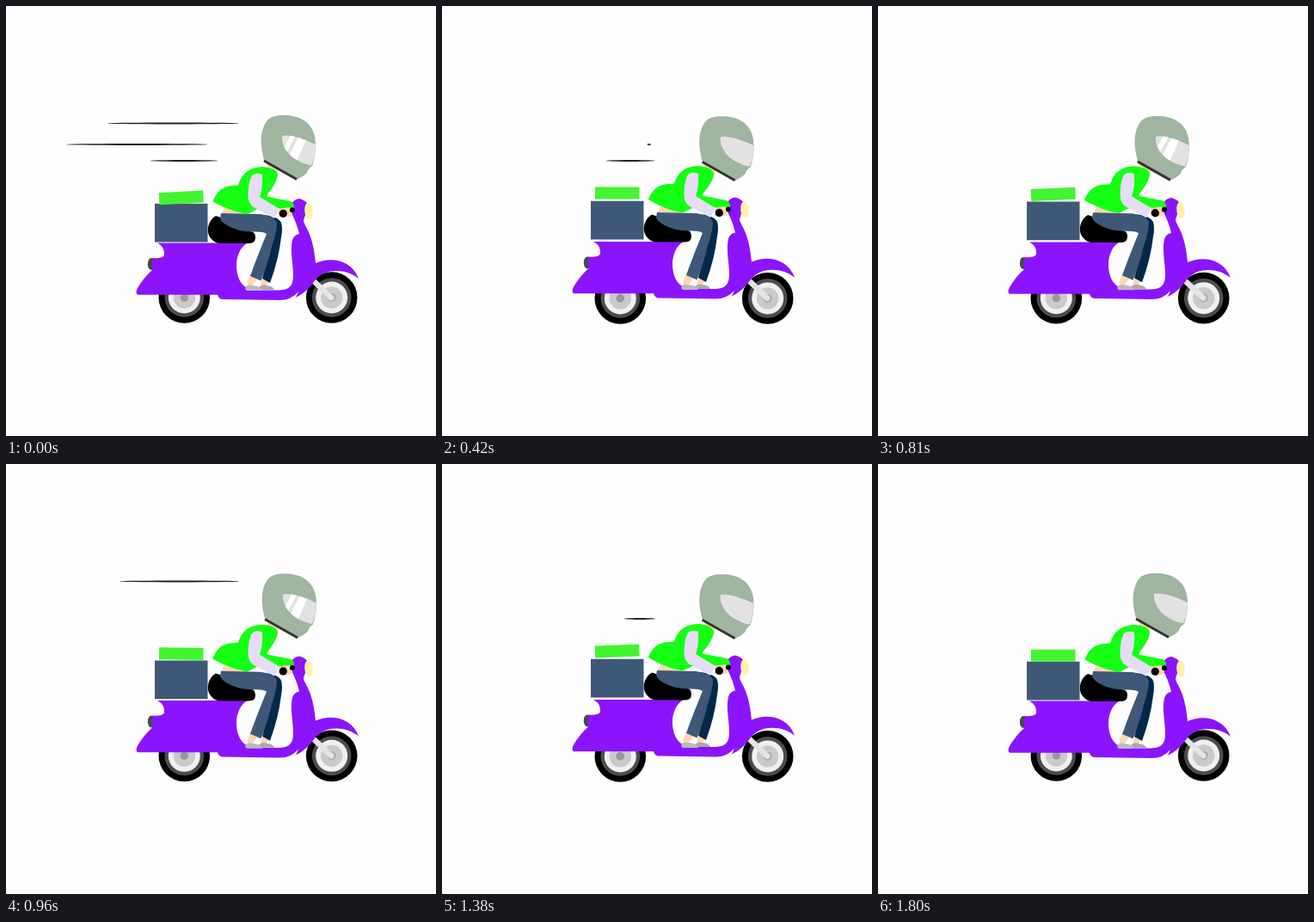
Animation of 500x500 px, one loop 1860 ms. Source, as an HTML page:

```html
<!DOCTYPE html>
<html lang="en">
<head>
<meta charset="utf-8">
<title>Scooter delivery</title>
<style>
html, body { margin: 0; width: 100%; height: 100%; overflow: hidden; background: #fefefe; }
svg { display: block; width: 100vw; height: 100vh; }
</style>
</head>
<body>
<svg viewBox="0 0 500 500">
  <defs>
    <g id="wheel">
      <circle r="29.8"/>
      <circle r="22.8" fill="#4d4d4d"/>
      <circle r="18.5" fill="#f0f0f0"/>
      <circle r="12.7" fill="#cacaca"/>
      <circle r="4.8" fill="#999"/>
    </g>
    <path id="visorShape" d="M321 151Q333 148 360 161Q360 174 355 185.500Q338 182 328 171Q320 161 321 151Z"/>
    <clipPath id="visorClip"><use href="#visorShape"/></clipPath>
  </defs>

  <g id="lines" fill="#222"></g>

  <g id="wheels">
    <use href="#wheel" x="207.3" y="339"/>
    <use href="#wheel" x="378.7" y="339"/>
  </g>

  <g id="fork">
    <circle cx="378.5" cy="339.5" r="4.4" fill="#b5b5b5"/>
    <path d="M358 320L378 339" stroke="#e4e4e7" stroke-width="6.5" stroke-linecap="round"/>
  </g>

  <g id="scooter">
    <ellipse cx="169" cy="300" rx="4.2" ry="7" fill="#484850"/>
    <path fill="#8c14fc" d="M176 275.500H281C272 280 267.500 292 268 304C269 318 275 329 289 330.500H318C330 330 334 325 334 313C334 300 330 285 333 272Q335 266 341 265Q338 252 331 239C330 230 334 225 341 224Q349 226 352 232L346 249C346 256 357 262 360 299C378 291 402 295 410 317C396 306 373 304 360 318Q350 333 337 339L340 332Q332 342 318 342L251 341Q247 340 246 335.700L153 335.700Q150 334 153 328Q160 316 170 307V293Q181 294 184 290Q185 280 176 275.500Z"/>
    <path d="M244 244C234 250 232 264 239 271Q243 276 250 276H283Q290 276 290 269Q290 262 283 262L272 256L250 246Z"/>
    <ellipse cx="352" cy="238.2" rx="4.8" ry="9.5" fill="#fff1a5" transform="rotate(-5 352 238)"/>
  </g>

  <path id="box" fill="#3f5878" d="M173 229.800H234.500V274.500H173Z"/>
  <path id="lid" fill="#42f530" d="M178 215.800H229.500V229.800H178Z"/>

  <g id="legs">
    <path fill="#ffd5b0" d="M255 232L281 238L278 245L250 243ZM284 312L292 318L286 326L280 323ZM300 315L306 320L302 327L296 324Z"/>
    <path fill="#03284a" d="M298 243Q316 244 320 252Q322 259 320 269Q317 295 307 322L298 317L303 298L306 262Z"/>
    <path fill="#3f5878" d="M250 241L296 242Q315 246 315 253Q315 262 309 280Q305 298 296.500 319.500L284 314Q291 294 303 265C298 261 286 264 272 261Q252 255 249 247Z"/>
    <path fill="#a9a9ad" d="M294 327Q297 323 303 325Q311 326 312 330H295Z"/>
    <path fill="#b9b9bd" d="M278 329Q279 323 286 325Q297 326 298 331L280 331Z"/>
  </g>

  <path id="neck" fill="#ffd5b0" d="M304 183L317 190L314 199L303 191Z"/>

  <path id="jacket" fill="#14ff14" d="M240.500 227.500C247 211 256 209 270 208.500C274 194 284 187.500 298 187Q316 188 316 197Q314 207 304 219L300 232L281 242Q261 239 240.500 227.500Z"/>

  <g id="arms">
    <path fill="#14ff14" d="M300 221L331 227Q336 230 335 235L320 236L298 230Z"/>
    <path fill="#e6dcf6" d="M286 197Q291 193 298 196Q299 210 295 222L318 236L312 247L288 234Q281 230 281.500 218Q282 204 286 197Z"/>
    <path fill="#ffd5b0" d="M317 236L329 234Q335 237 332 244Q326 247 317 245Z"/>
    <circle cx="333" cy="237.3" r="3"/>
    <circle cx="322.3" cy="241.3" r="4.6"/>
  </g>

  <g id="head">
    <path fill="#9fb5a0" d="M300 179C296 164 294 147 303 134C308 127 318 127 326 127C347 128 360 140 360 161Q360 174 356 186Q351 189 350 194Q346 198 339 201.500Z"/>
    <use href="#visorShape" fill="#e2e2e3"/>
    <g clip-path="url(#visorClip)">
      <path id="shine" fill="#fff" d="M316 178L334 146H340L322 180ZM325 184L343 148H353L335 188Z"/>
    </g>
    <path d="M300 180L338 201.500" stroke="#333" stroke-width="3"/>
  </g>
</svg>
<script>
const LOOP = 1860, STEP = 30, LAST = 60;
const $ = id => document.getElementById(id);
const ease = x => x * x * (3 - 2 * x);
const move = (id, x, y, extra = "") =>
  $(id).setAttribute("transform", `translate(${x} ${y}) ${extra}`);

// Each line shrinks towards its pivot; start and length are in steps.
const streaks = [
  { left: 119, right: 270, y: 136.5, pivot: 276, start: 0, length: 11 },
  { left: 71, right: 234, y: 161, pivot: 243.3, start: 5, length: 10 },
  { left: 168, right: 246, y: 180, pivot: 249.7, start: 10, length: 11.4 }
];
for (const s of streaks) {
  s.path = document.createElementNS("http://www.w3.org/2000/svg", "path");
  const inset = (s.right - s.left) * .3;
  const a = s.left + inset, b = s.right - inset;
  s.path.setAttribute("d",
    `M${s.left} ${s.y - .3}C${a} ${s.y - 1.1} ${b} ${s.y - 1.1} ${s.right} ${s.y - .3}` +
    `v.6C${b} ${s.y + 1.2} ${a} ${s.y + 1.2} ${s.left} ${s.y + .3}Z`);
  $("lines").append(s.path);
}

function drawStreaks(n) {
  for (const s of streaks) {
    const age = n < s.start ? 0 : n < 30 ? n - s.start : n - 30 - s.start;
    const shown = n < LAST && age >= 0 && age < s.length;
    const k = shown ? 1 - ease(age / s.length) : 0;
    s.path.style.display = shown ? "" : "none";
    s.path.setAttribute("transform", `translate(${s.pivot * (1 - k)} 0) scale(${k} 1)`);
  }
}

function lidAngle(n, phase) {
  const wobble = phase < .4
    ? .9 * Math.sin(Math.PI * phase / .4)
    : -2.6 * Math.sin(Math.PI * (phase - .4) / .6);
  return wobble - 3 * Math.max(0, 1 - n / 3);
}

function draw(t) {
  const n = Math.min(LAST, Math.floor(t / STEP));
  const phase = n % 10 / 10;
  const b = ease(1 - Math.abs(1 - 2 * phase));

  drawStreaks(n);
  move("wheels", 0, b);
  move("fork", 0, b * .5);
  move("scooter", 0, -1.6 * b);
  move("box", 0, -3.4 * b);
  move("lid", 0, -6 * b, `rotate(${lidAngle(n, phase)} 204 223)`);
  move("legs", 0, -b);
  move("jacket", -b, 0, `rotate(${1.8 * b} 330 232)`);
  move("arms", 0, -b);
  move("neck", 1.5 * b, 0);
  move("head", 2.9 * b, 1.4 * b);

  const sweep = (n + 8) % 30;
  $("shine").style.display = n < LAST && sweep < 20 ? "" : "none";
  move("shine", (sweep - 10) * .3, 0);
}

const origin = performance.now();
function tick() {
  draw((performance.now() - origin) % LOOP);
  requestAnimationFrame(tick);
}
tick();
</script>
</body>
</html>
```
